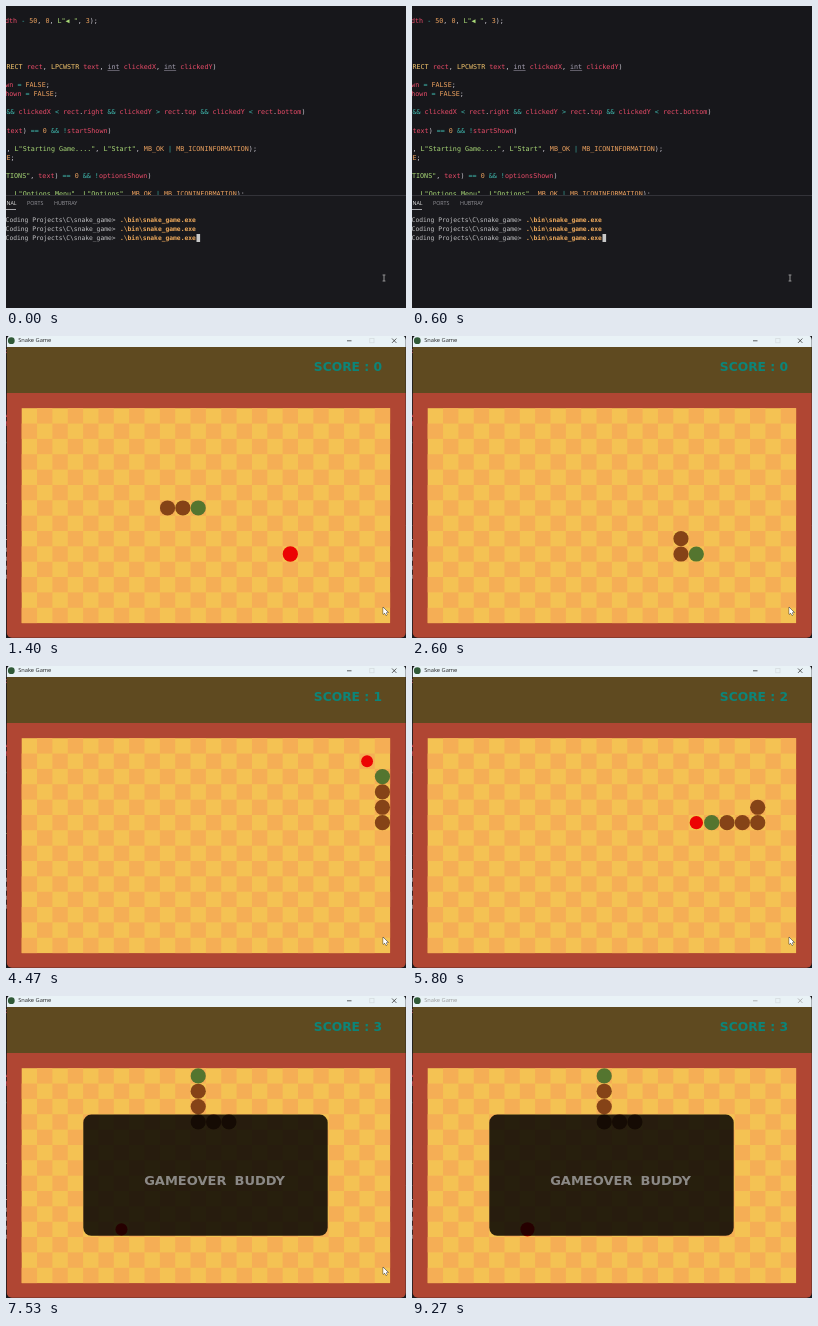
These frames come from a looping animation (400 by 302 pixels, 9340 ms). An HTML page with a canvas:

```html
<!DOCTYPE html>
<html lang="en">
<head>
<meta charset="utf-8">
<title>Snake Game</title>
<style>
  html, body { margin: 0; overflow: hidden; background: #17171b; }
  canvas { display: block; }
</style>
</head>
<body>
<canvas id="stage" width="400" height="302"></canvas>
<script>
const ctx = document.getElementById('stage').getContext('2d');
const LOOP = 9340, TICK = 137, FIRST_TICK = 662;
const CELL = 15.35, COLS = 24, ROWS = 14, LEFT = 15.7, TOP = 72.2;
const PROMPT = 638, OPEN = 640, LEAVE = 8800, BLUR = 8930, DEAD_TICK = 50;
const CODE_SIZE = 6.71, ADVANCE = CODE_SIZE * .602;
const MONO = '"DejaVu Sans Mono", monospace';
const SANS = '"Open Sans", "Noto Sans", sans-serif';
const ARCADE = '"DejaVu Sans", sans-serif';

// Code lines: left edge, vertical centre, text
const code = [
  [-1, 15, 'dth - 50, 0, L"◀ ", 3);'],
  [.5, 61, 'RECT rect, LPCWSTR text, int clickedX, int clickedY)'],
  [-.7, 79, 'wn = FALSE;'],
  [-.7, 88, 'hown = FALSE;'],
  [.5, 106, '&& clickedX < rect.right && clickedY > rect.top && clickedY < rect.bottom)'],
  [.5, 125, 'text) == 0 && !startShown)'],
  [.5, 143, ', L"Starting Game....", L"Start", MB_OK | MB_ICONINFORMATION);'],
  [-7.5, 152, 'RUE;'],
  [0, 170, 'TIONS", text) == 0 && !optionsShown)'],
  [.5, 188, ', L"Options Menu", L"Options", MB_OK | MB_ICONINFORMATION);'],
];
const syntax = [
  [/^(L?"[^"]*"|TIONS")/, '#a9d977'],
  [/^(FALSE|RUE|MB_\w+|\d+)/, '#eda25f'],
  [/^(RECT|LPCWSTR)\b/, '#f2c46d'],
  [/^int\b/, '#a8a3b5'],
  [/^\w+/, '#ea4c69'],
  [/^[&|=<>!-]+/, '#3fb8ae'],
  [/^./, '#c9c6cf'],
];

// Snake route, starting with the body it is born with
const route = [[4, 6], [5, 6], [6, 6]];
const headings = { R: [1, 0], L: [-1, 0], U: [0, -1], D: [0, 1] };
for (const [, dir, count] of 'R10 D3 R7 U8 L2 D4 L6 U2 L4 U3'.matchAll(/(\w)(\d+)/g)) {
  for (let i = 0; i < +count; i++) {
    const [x, y] = route[route.length - 1], [dx, dy] = headings[dir];
    route.push([x + dx, y + dy]);
  }
}
const foods = [[17, 9], [22, 1], [17, 5], [6, 10]];
const mealTicks = [14, 29, 38];

const clamp = v => Math.max(0, Math.min(1, v));

function box(x, y, w, h, color) {
  ctx.fillStyle = color;
  ctx.fillRect(x, y, w, h);
}

function disc(x, y, r, color) {
  ctx.fillStyle = color;
  ctx.beginPath();
  ctx.arc(x, y, r, 0, Math.PI * 2);
  ctx.fill();
}

function cellDisc([col, row], r, color) {
  disc(LEFT + (col + .5) * CELL, TOP + (row + .5) * CELL, r, color);
}

function label(str, x, y, font, color, baseline = 'middle') {
  ctx.font = font;
  ctx.fillStyle = color;
  ctx.textBaseline = baseline;
  ctx.fillText(str, x, y);
}

function arcade(str, x, y, size, color) {
  label(str, x, y, `bold ${size}px ${ARCADE}`, color, 'alphabetic');
}

function lines(segments, color) {
  ctx.strokeStyle = color;
  ctx.lineWidth = .7;
  ctx.beginPath();
  for (const [x1, y1, x2, y2] of segments) {
    ctx.moveTo(x1, y1);
    ctx.lineTo(x2, y2);
  }
  ctx.stroke();
}

function codeLine(left, y, str) {
  for (let i = 0; i < str.length;) {
    const rest = str.slice(i), x = left + i * ADVANCE;
    const [rule, color] = syntax.find(([re]) => re.test(rest));
    const token = rest.match(rule)[0];
    label(token, x, y, `${CODE_SIZE}px ${MONO}`, color);
    if (token === 'int') box(x, y + 3, 3 * ADVANCE, .5, color);
    i += token.length;
  }
}

function drawEditor(t) {
  box(0, 0, 400, 302, '#17171b');
  code.forEach(line => codeLine(...line));
  box(0, 189, 400, 113, '#19191d');
  box(0, 189, 400, .8, '#3a3a40');
  const tab = `5.3px ${SANS}`;
  label('INAL', -1, 198, tab, '#e4e4e4');
  label('PORTS', 21, 198, tab, '#96969c');
  label('HUBTRAY', 48, 198, tab, '#96969c');
  box(0, 203, 10, .8, '#c8c8cc');

  const font = `6.31px ${MONO}`, done = t >= PROMPT;
  for (let i = 0; i < (done ? 4 : 3); i++) {
    const y = 214 + i * 9.1;
    label('Coding Projects\\C\\snake_game>', -.4, y, font, '#c2c2c4');
    if (i < 3) label('.\\bin\\snake_game.exe', 114, y, 'bold ' + font, '#eda95c');
  }
  box(done ? 114 : 190.5, done ? 237 : 228, 3.6, 8, '#c8c8c8');
}

function drawTitleBar(active) {
  const ink = active ? '#222' : '#999';
  box(0, -1, 400, 12, '#e9f2f6');
  disc(5.3, 4.7, 3.4, '#315a38');
  label('Snake Game', 12.2, 5, `5.7px ${SANS}`, ink);
  lines([[341, 4.8, 345.5, 4.8], [386, 2.5, 390.4, 6.9], [390.4, 2.5, 386, 6.9]], ink);
  ctx.strokeStyle = '#d3dadd';
  ctx.strokeRect(363.8, 2.6, 4.2, 4.2);
}

function drawGame(t) {
  const tick = Math.max(0, Math.floor((t - FIRST_TICK) / TICK));
  const score = mealTicks.filter(n => n < tick).length;
  const head = Math.min(tick, DEAD_TICK - 1) + 2;

  drawTitleBar(t < BLUR);
  box(0, 11, 400, 46, '#5f4a20');
  box(0, 57, 400, 246, '#b04633');
  arcade('SCORE : ' + score, 307.8, 34.8, 12.3, '#0c8579');

  box(LEFT, TOP, COLS * CELL, ROWS * CELL, '#f4c253');
  for (let row = 0; row < ROWS; row++)
    for (let col = (row + 1) % 2; col < COLS; col += 2)
      box(LEFT + col * CELL, TOP + row * CELL, CELL, CELL, '#f5ae55');

  const pulse = Math.cos((t - 730) / 702 * Math.PI * 2);
  cellDisc(foods[score], 6.5 + 1.2 * pulse, '#ec0303');
  for (let i = head - 2 - score; i <= head; i++)
    cellDisc(route[i], 7.6, i === head ? '#54752f' : '#854317');

  if (tick >= DEAD_TICK) {
    ctx.fillStyle = 'rgba(0, 0, 0, .84)';
    ctx.beginPath();
    ctx.roundRect(77.3, 118.6, 244.4, 121.2, 8);
    ctx.fill();
    arcade('GAMEOVER', 138.2, 189, 13, '#8b8986');
    arcade('BUDDY', 228.5, 189, 13, '#8b8986');
  }
}

// The window pops up with a short zoom and fade
function drawWindow(t, opening) {
  const scale = 1 - .13 * (1 - opening) ** 3;
  ctx.save();
  ctx.globalAlpha = Math.min(1, opening * 3);
  ctx.translate(125, 110);
  ctx.scale(scale, scale);
  ctx.translate(-125, -110);
  ctx.beginPath();
  ctx.roundRect(.8, -1, 398.9, 302.7, 5);
  ctx.clip();
  drawGame(t);
  ctx.restore();
}

function drawPointer(t, arrow) {
  if (!arrow) {
    lines([[378, 269.3, 378, 274.8], [376.6, 269, 379.4, 269], [376.6, 275, 379.4, 275]], '#ccc');
    return;
  }
  const away = clamp((t - LEAVE) / (BLUR - LEAVE));
  const shape = new Path2D('M0 0V7L1.6 5.6L2.7 8L3.8 7.5L2.8 5.2H5Z');
  ctx.save();
  ctx.translate(377.2 + 26 * away * away, 271.2);
  ctx.fillStyle = '#fff';
  ctx.strokeStyle = '#222';
  ctx.lineWidth = .9;
  ctx.stroke(shape);
  ctx.fill(shape);
  ctx.restore();
}

function draw(now) {
  const t = now % LOOP;
  const opening = clamp((t - OPEN) / 250);
  drawEditor(t);
  if (opening > 0) drawWindow(t, opening);
  drawPointer(t, opening > 0);
  requestAnimationFrame(draw);
}
requestAnimationFrame(draw);
</script>
</body>
</html>
```
